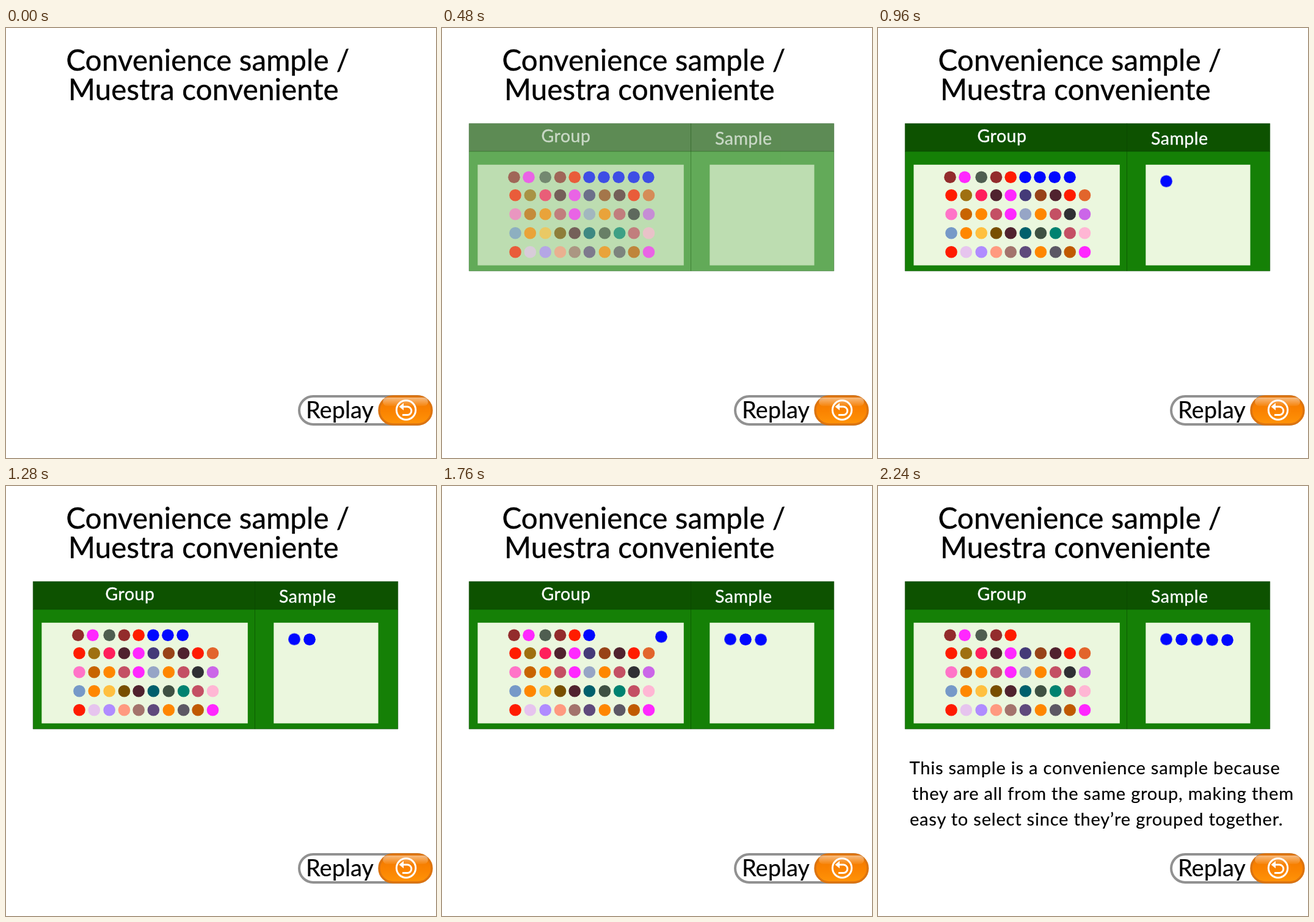
An HTML page for the animation above (2320 ms loop, 704 by 704 pixels).

```html
<!DOCTYPE html>
<html lang="en">
<head>
<meta charset="utf-8">
<title>Convenience sample</title>
<style>
html, body { margin: 0; width: 100%; height: 100%; overflow: hidden; background: #fff; }
svg { display: block; width: 100vw; height: 100vh; }
text { font-family: Lato, "Open Sans", sans-serif; stroke: currentColor; fill: currentColor; }
.title { font-size: 47.5px; letter-spacing: .1px; stroke-width: .4px; }
.head { font-size: 28.5px; letter-spacing: .5px; color: #fff; stroke-width: .4px; }
.note { font-size: 29px; letter-spacing: .8px; stroke-width: .2px; }
.label { font-size: 38px; stroke-width: .2px; }

/* 29 ticks of 80 ms; every change takes three of them */
.table > *, .dots > *, .note { animation: fade 2.32s linear infinite; }
.note { animation-name: tell; }
@keyframes fade {
  0% { opacity: 0; }
  17.24% { opacity: 0; animation-timing-function: steps(3, start); }
  27.58%, 100% { opacity: 1; }
}
@keyframes tell {
  0% { opacity: 0; }
  89.65% { opacity: 0; animation-timing-function: steps(3, start); }
  100% { opacity: 1; }
}
@keyframes pick0 {
  0% { transform: translate(0, 0); }
  31.03% { transform: translate(0, 0); animation-timing-function: steps(3, start); }
  41.37%, 100% { transform: translate(var(--dx), var(--dy)); }
}
@keyframes pick1 {
  0% { transform: translate(0, 0); }
  48.27% { transform: translate(0, 0); animation-timing-function: steps(3, start); }
  58.62%, 100% { transform: translate(var(--dx), var(--dy)); }
}
@keyframes pick2 {
  0% { transform: translate(0, 0); }
  62.06% { transform: translate(0, 0); animation-timing-function: steps(3, start); }
  72.41%, 100% { transform: translate(var(--dx), var(--dy)); }
}
@keyframes pick3 {
  0% { transform: translate(0, 0); }
  75.86% { transform: translate(0, 0); animation-timing-function: steps(3, start); }
  86.2%, 100% { transform: translate(var(--dx), var(--dy)); }
}
@keyframes pick4 {
  0% { transform: translate(0, 0); }
  89.65% { transform: translate(0, 0); animation-timing-function: steps(3, start); }
  100% { transform: translate(var(--dx), var(--dy)); }
}
</style>
</head>
<body>
<svg viewBox="0 0 704 704">
  <defs>
    <linearGradient id="orange" x2="0" y2="1">
      <stop offset="0" stop-color="#f07800"/>
      <stop offset=".5" stop-color="#fa8200"/>
      <stop offset="1" stop-color="#ff9408"/>
    </linearGradient>
    <linearGradient id="shine" x2="0" y2="1">
      <stop offset="0" stop-color="#fff" stop-opacity=".5"/>
      <stop offset="1" stop-color="#fff" stop-opacity=".05"/>
    </linearGradient>
  </defs>

  <text class="title" x="98.5" y="70">Convenience sample /</text>
  <text class="title" x="102" y="118">Muestra conveniente</text>

  <g class="table">
    <rect x="44.3" y="202" width="597.4" height="195.8" fill="#158006"/>
    <rect x="44.3" y="156.4" width="597.4" height="45.6" fill="#0d5200"/>
    <path d="M44.3 156.4H641.7V397.8H44.3ZM44 202H642M407.5 156V398" fill="none" stroke="#0a4300" stroke-width=".6"/>
    <rect x="58.4" y="223.8" width="337.4" height="164.8" fill="#ebf7de"/>
    <rect x="438.3" y="223.8" width="171.2" height="164.8" fill="#ebf7de"/>
    <text class="head" x="162.5" y="187">Group</text>
    <text class="head" x="447" y="191">Sample</text>
  </g>
  <g class="dots"></g>

  <text class="note" x="51.5" y="472">This sample is a convenience sample because</text>
  <text class="note" x="56" y="514">they are all from the same group, making them</text>
  <text class="note" x="52" y="556">easy to select since they’re grouped together.</text>

  <g>
    <rect x="480" y="603" width="216" height="46" rx="23" fill="#fff" stroke="#919191" stroke-width="4"/>
    <rect x="611" y="603" width="86" height="46" rx="23" fill="url(#orange)" stroke="#dc7410" stroke-width="3.5"/>
    <rect x="617" y="605" width="74" height="14" rx="7" fill="url(#shine)"/>
    <text class="label" x="491" y="639">Replay</text>
    <g fill="none" stroke="#fff" stroke-width="3">
      <circle cx="655" cy="625.5" r="15.7"/>
      <path d="M649 620H657A6.8 6.8 0 0 1 657 633.6H649"/>
      <path d="M643.5 620L651 614V626Z" fill="#fff" stroke="none"/>
    </g>
  </g>
</svg>
<script>
const rows = [
  '932c2c ff28ff 4f5e50 932c2c ff1c00 0008ff 0008ff 0008ff 0008ff 0008ff',
  'ff1c00 9f7010 ff1f5c 50222e ff28ff 443a78 984318 50222e ff1c00 e2652c',
  'ff74c8 c86400 ff8700 c45064 ff28ff 96a5c6 ff8700 c45064 303034 cb66e8',
  '7699c8 ff8700 ffc040 784f00 50222e 00606c 3f5142 008270 c45064 ffb6d4',
  'ff1c00 e6c4ee b08cff ff9a80 a3746c 5e4a7c ff8700 5c5864 c05a00 ff28ff'
];
const topX = [118, 142, 169.2, 193.5, 217.2, 241, 265, 289.2, 314, 337.8];
const colX = [120, 144.3, 169.2, 193.5, 217.2, 241.4, 266.4, 290.7, 314.2, 338.5];
const rowY = [244.2, 273.7, 304.8, 335.8, 366.8];
const group = document.querySelector('.dots');

function addDot(x, y, color) {
  const dot = document.createElementNS('http://www.w3.org/2000/svg', 'circle');
  dot.setAttribute('cx', x);
  dot.setAttribute('cy', y);
  dot.setAttribute('r', 9.8);
  dot.setAttribute('fill', '#' + color);
  group.append(dot);
  return dot;
}

rows.forEach((row, r) => row.split(' ').forEach((color, c) => {
  const x = (r ? colX : topX)[c], y = rowY[r];
  const dot = addDot(x, y, color);
  if (r || c < 5) return;
  // the blue dots leave from right to left
  const n = 9 - c;
  dot.style.setProperty('--dx', 472 + 25 * n - x + 'px');
  dot.style.setProperty('--dy', 250.8 + .35 * n - y + 'px');
  dot.style.animationName = 'fade, pick' + n;
}));
</script>
</body>
</html>
```
